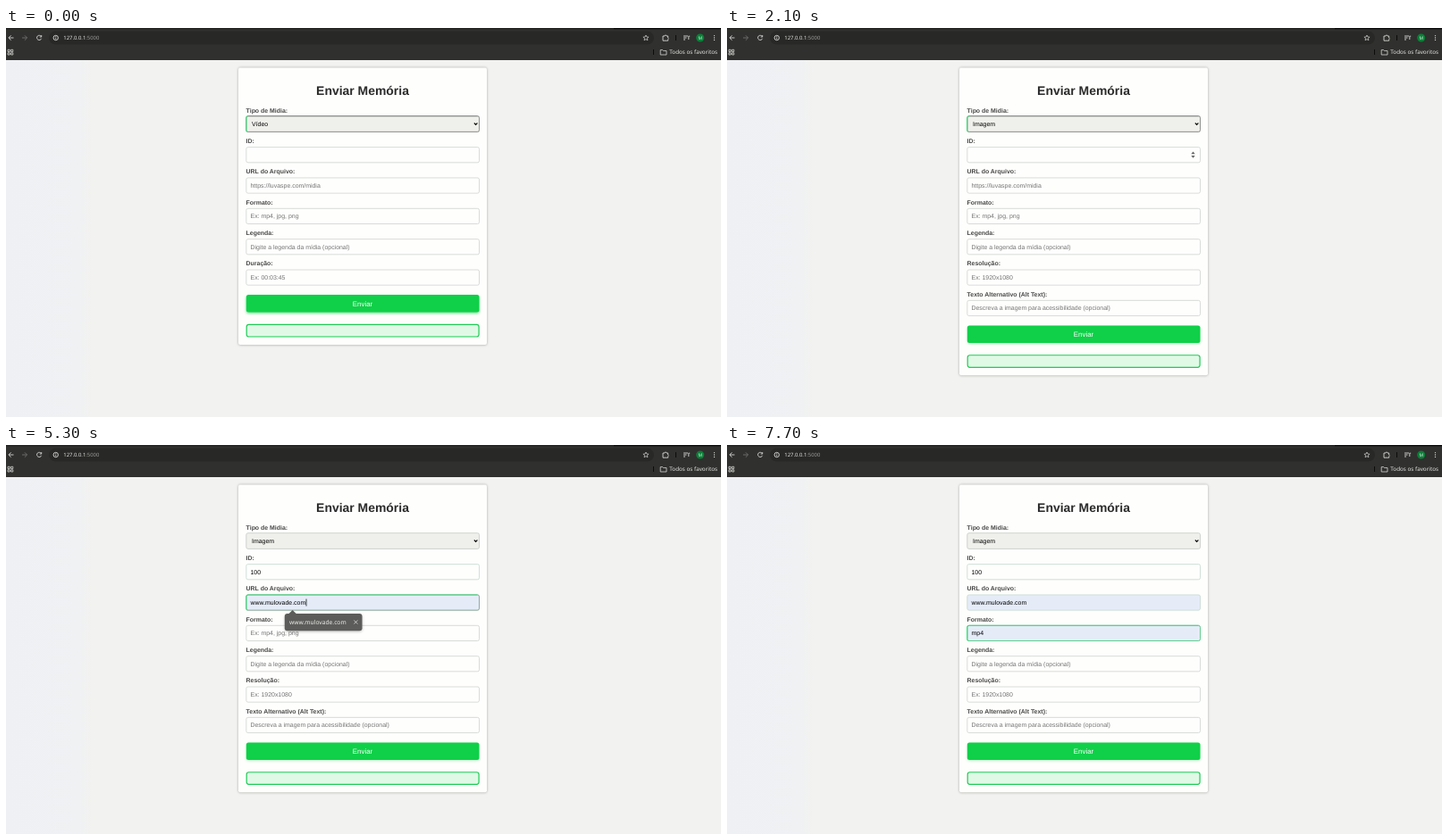
These frames come from a looping animation (800x436 px, 8000 ms). An HTML page:

```html
<!DOCTYPE html>
<html lang="pt">
<head>
<meta charset="utf-8">
<style>
html, body { margin: 0; width: 100%; height: 100%; overflow: hidden; background: #f2f2f0; }
svg { display: block; width: 800px; height: 436px; }
text { font: 6.95px "Liberation Sans", Arial, sans-serif; text-rendering: geometricPrecision; white-space: pre; }
.title { font-size: 13.95px; font-weight: bold; fill: #2b2b2b; text-anchor: middle; }
.label { font-weight: bold; fill: #484848; }
.hint { fill: #747474; }
.send { font-size: 7.9px; fill: #fff; text-anchor: middle; }
.ui { font-family: "Noto Sans", "Open Sans", sans-serif; }
.icon { fill: none; stroke: #d6d6d4; stroke-width: .9; }
</style>
</head>
<body>
<svg viewBox="0 0 800 436">
  <defs>
    <linearGradient id="page">
      <stop offset="0" stop-color="#eef0f4"/><stop offset=".1" stop-color="#eff1f3"/>
      <stop offset=".12" stop-color="#f2f2f0"/><stop offset="1" stop-color="#f2f2f0"/>
    </linearGradient>
    <filter id="soft" x="-10%" y="-10%" width="120%" height="120%"><feGaussianBlur stdDeviation="1.6"/></filter>
  </defs>
  <rect y="36" width="800" height="400" fill="url(#page)"/>
  <rect width="800" height="36" fill="#30302e"/>
  <rect width="800" height="1.5" fill="#232322"/>
  <rect x="680" width="120" height="1.2" fill="#0c0c0c"/>
  <rect x="48" y="3.5" width="677" height="15" rx="7.5" fill="#282826"/>
  <g class="icon">
    <path d="M8.5 11H3M5.6 8.3L2.9 11L5.6 13.7"/>
    <path d="M18 11h5.5M20.9 8.3L23.6 11L20.9 13.7" stroke="#70706e"/>
    <path d="M39.3 9.4A2.6 2.6 0 1 0 39.6 11.8M39.7 8v2h-2"/>
    <circle cx="55.7" cy="11" r="2.7"/>
    <path d="M55.7 10.6v2M55.7 9v.8"/>
    <path d="M716 8l.9 2 2.2.2-1.7 1.4.5 2.2-1.9-1.2-1.9 1.2.5-2.2-1.7-1.4 2.2-.2z" stroke-width=".7"/>
    <path d="M735 9h2a1 1 0 0 1 2 0h1.700v2a1 1 0 0 1 0 1.800v1.400H735z"/>
    <path d="M749.5 8v6M724.5 24v6" stroke="#080808"/>
    <path d="M758 9h5M758 11h3.500M758 13h2M763.800 13V9.200h1.400"/>
    <path d="M732.200 24.600h2.500l.8 1h3.500v4.400h-6.800z" stroke-width=".8"/>
    <path d="M2 24.300h2.200v2.200H2zM5.600 24.300h2.200v2.200H5.600zM2 27.800h2.200V30H2zM5.600 27.800h2.200V30H5.600z" stroke-width=".8"/>
  </g>
  <g fill="#d6d6d4"><circle cx="792.500" cy="8.600" r=".7"/><circle cx="792.500" cy="11" r=".7"/><circle cx="792.500" cy="13.400" r=".7"/></g>
  <circle cx="776.700" cy="11" r="4.500" fill="#0b8038"/>
  <text class="ui" x="776.700" y="12.800" text-anchor="middle" fill="#dfeee4" style="font-size:5px">M</text>
  <text class="ui" x="64.300" y="13.100" fill="#e4e4e2" style="font-size:5.9px">127.0.0.1<tspan fill="#9c9c9a">:5000</tspan></text>
  <text class="ui" x="796" y="29.200" text-anchor="end" fill="#e4e4e2" style="font-size:6.300px">Todos os favoritos</text>
  <g id="form"></g>
</svg>
<script>
const form = document.getElementById('form');
const LOOP = 8000, X = 268.8, W = 260.7, STEP = 34.35, GREEN = '#0fd048';
const SITE = 'www.mulovade.com';

const clamp = v => Math.max(0, Math.min(1, v));
const between = (t, a, b) => t >= a && t < b;
const fade = (t, a, b) => Math.min(clamp((t - a) / 300), 1 - clamp((t - b) / 350));
const rect = (x, y, w, h, attrs) => `<rect x="${x}" y="${y}" width="${w}" height="${h}" ${attrs}/>`;
const text = (x, y, s, cls = '', attrs = '') => `<text x="${x}" y="${y}" class="${cls}" ${attrs}>${s}</text>`;
const line = (d, color, w = .9) => `<path d="${d}" fill="none" stroke="${color}" stroke-width="${w}"/>`;

// focus: opacity of the coloured border; edge: its lower right tone
function field(y, h, { fill = '#fefefd', border = '#d0d3d0', focus = 0, edge = '#8aa596', top = '#3fdc7c' } = {}) {
  const b = y + h, r = X + W;
  return rect(X, y, W, h, `rx="2" fill="${fill}" stroke="${border}" stroke-width=".8"`) +
    `<g opacity="${focus}">` +
    rect(X, y, W, h, `rx="2" fill="none" stroke="${edge}" stroke-width=".9"`) +
    line(`M${X + 1.5} ${b}Q${X} ${b} ${X} ${b - 2}V${y + 2}Q${X} ${y} ${X + 2} ${y}`, '#2ee071', 1) +
    line(`M${X + 2} ${y}H${r - 2}`, top) + '</g>';
}

function input(i, { label, hint = '', value = '', caret, ...style }) {
  const y = 133.6 + STEP * i;
  let s = text(268.6, y - 4.7, label, 'label') + field(y, 17.2, style);
  s += text(273.5, y + 10.9, value || hint, value ? '' : 'hint');
  if (caret) s += line(`M${caret} ${y + 4.6}v8`, '#111', .8);
  return s;
}

function suggestion(y, w, s, hover, opacity) {
  const fill = hover ? '#5c5c5a' : '#1b1c1b';
  const cross = hover ? line(`M${w + 302.700} ${y + 7.500}l4 4m0-4l-4 4`, '#e2e2e0', .8) : '';
  return `<g opacity="${opacity}">` +
    rect(311.800, y + 1, w, 19.300, 'rx="3" fill="#000" opacity=".25" filter="url(#soft)"') +
    `<path d="M316 ${y + .5}l4.600-4.500 4.600 4.500z" fill="${fill}"/>` +
    rect(311.800, y, w, 19.200, `rx="3" fill="${fill}"`) +
    text(317, y + 11.900, s, 'ui', 'fill="#ececea" style="font-size:6.700px"') + cross + '</g>';
}

function dropdown(active) {
  let s = rect(X, 117, W, 25, 'fill="#000" opacity=".3" filter="url(#soft)"') +
    rect(X - .3, 116.600, W + .6, 23.300, 'fill="#efefeb" stroke="#777" stroke-width=".6"') +
    rect(X, 117 + active * 11.300, W, 11.300, 'fill="#1a50cc"');
  ['Vídeo', 'Imagem'].forEach((name, i) =>
    s += text(275, 125 + i * 11.200, name, '', `fill="${i == active ? '#fff' : '#111'}"`));
  return s;
}

function draw(t) {
  const image = t >= 1800, drop = image ? STEP : 0;
  let s = rect(260, 44.600, 278, 310.600 + drop, 'rx="2" fill="#000" opacity=".3" filter="url(#soft)"') +
    rect(260, 44.600, 278, 310.400 + drop, 'rx="2" fill="#fefefc"') +
    text(399, 75.300, 'Enviar Memória', 'title') +
    text(268.600, 94.500, 'Tipo de Mídia:'.replace('í', 'i'), 'label');

  s += field(98.700, 17.700, {
    fill: '#efefeb', border: '#c6c9c6', edge: '#8b8d8a', top: '#8b8d8a', focus: 1 - clamp((t - 2400) / 300)
  }) + text(275, 109.900, image ? 'Imagem' : 'Vídeo') + line('M523.800 106.500l1.800 1.900 1.800-1.900', '#111', 1.100);

  const digits = [3000, 3200, 3900].filter(at => t >= at).length;
  const softBorder = t >= 4100 ? '#c5d9cf' : undefined;
  s += input(0, {
    label: 'ID:', value: '100'.slice(0, digits), border: softBorder,
    focus: fade(t, 2400, 4150), edge: '#58d78b', caret: between(t, 2500, 4100) && 273.800 + digits * 3.860
  });
  if (between(t, 1900, 4100))
    s += '<path d="M519.300 141.300l2.200-2.700 2.200 2.700zM519.300 143l2.200 2.700 2.200-2.700z" fill="#666"/>';

  const filledUrl = t >= 4700, filledFormat = t >= 6900;
  s += input(1, {
    label: 'URL do Arquivo:', hint: 'https://luvaspe.com/midia', value: filledUrl ? SITE : '',
    fill: filledUrl ? '#e5ecf8' : undefined, border: softBorder, focus: fade(t, 4000, 5700),
    caret: between(t, 4100, 4700) ? 273.800 : between(t, 5300, 5700) && 336
  });
  s += input(2, {
    label: 'Formato:', hint: 'Ex: mp4, jpg, png', value: filledFormat ? 'mp4' : '',
    fill: filledFormat ? '#e5ecf8' : undefined, focus: fade(t, 5650, LOOP + 400),
    edge: t < 7100 ? '#86a895' : '#55cd87',
    caret: between(t, 5700, 6200) || between(t, 6800, 6900) ? 273.800 : between(t, 7100, 7700) && 287.600
  });
  s += input(3, { label: 'Legenda:', hint: 'Digite a legenda da mídia (opcional)' });
  s += image
    ? input(4, { label: 'Resolução:', hint: 'Ex: 1920x1080' }) +
      input(5, { label: 'Texto Alternativo (Alt Text):', hint: 'Descreva a imagem para acessibilidade (opcional)' })
    : input(4, { label: 'Duração:', hint: 'Ex: 00:03:45' });

  s += rect(X, 300.500 + drop, W, 19.500, `rx="2.500" fill="${GREEN}" opacity="${image ? .25 : .6}" filter="url(#soft)"`) +
    rect(X, 299.100 + drop, W, 19.500, `rx="2.500" fill="${GREEN}"`) +
    text(399, 311.500 + drop, 'Enviar', 'send') +
    rect(X + .4, 332.400 + drop, W - .8, 13.600, 'rx="2.500" fill="#e0f9e6" stroke="#1fcb55" stroke-width="1.200"');

  if (between(t, 900, 1800)) s += dropdown(t < 1700 ? 0 : 1);
  if (between(t, 4150, 5500)) s += suggestion(189, 86.700, SITE, t >= 4900, t < 5400 ? 1 : .5);
  if (between(t, 5800, 7300)) s += suggestion(223.300, 67.700, 'mp4', t >= 6900, t < 7200 ? 1 : .5);
  return s;
}

let last;
function frame() {
  const next = draw(performance.now() % LOOP);
  if (next !== last) form.innerHTML = last = next;
  requestAnimationFrame(frame);
}
frame();
</script>
</body>
</html>
```
